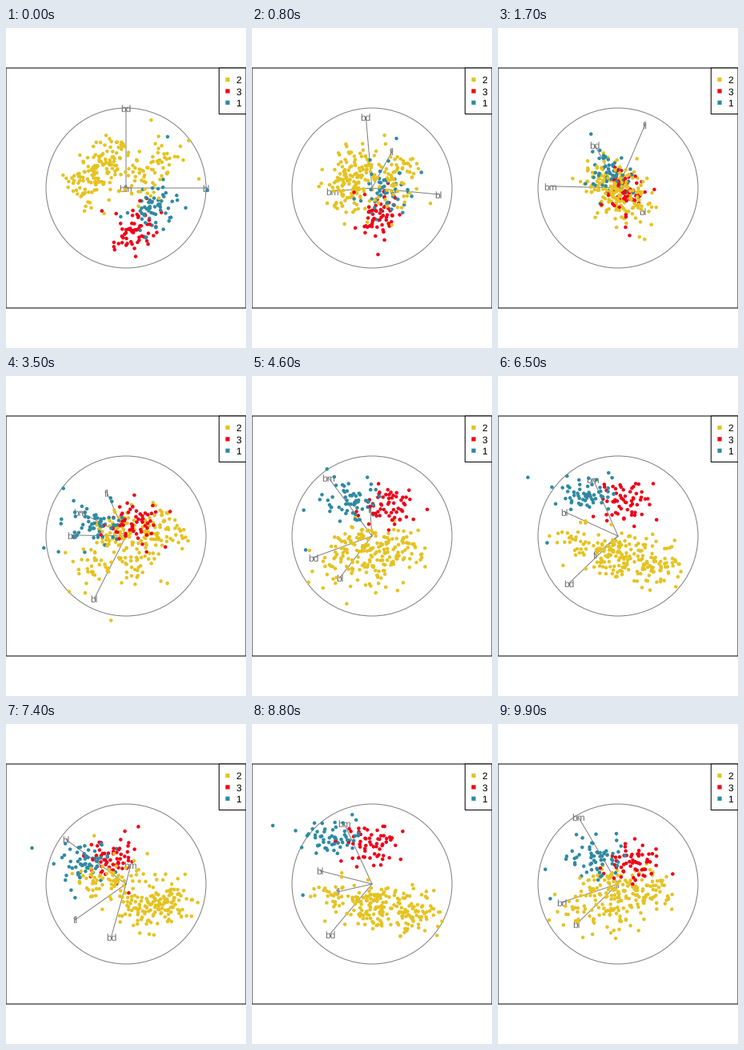
A matplotlib script for the animation above (10000 ms loop, 300x400 px).

```python
import numpy as np
import matplotlib.pyplot as plt
from matplotlib.animation import FuncAnimation
from matplotlib.patches import Circle, Rectangle

W, H, DPI = 300, 400, 100
PX = 72 / DPI
FRAMES, INTERVAL = 100, 100
CENTER, RADIUS, SCALE = np.array([150, 200]), 100, 35.6
YELLOW, RED, BLUE = "#e5c320", "#f00018", "#2f8aa2"
GREY = "#7f7f7f"
NAMES = ["bl", "bd", "fl", "bm"]

plt.rcParams.update({"font.family": "Liberation Sans", "text.hinting": "none",
                     "font.size": 12 * PX})
rng = np.random.default_rng(11)

# Standardised data: three kinds, each with a small and a large half
SPREAD = np.array([0.41, 0.42, 0.41, 0.38])
GROWTH = np.array([0.70, 0.77, 0.50, 0.85])


def kind(n, mean):
    """Two mildly correlated normal clouds, the second one shifted."""
    clouds = []
    for size in (0, 1):
        z = 0.4 * rng.normal(size=(n, 1)) + 0.9 * rng.normal(size=(n, 4))
        z = (z - z.mean(0)) / z.std(0)
        clouds.append(mean + size * GROWTH + z * SPREAD)
    return np.vstack(clouds)


first = kind(73, (-1.29, 0.22, -1.02, -1.04))
second = kind(59, (0.29, -1.49, 0.91, 0.66))
third = kind(34, (0.54, 0.25, -0.62, -0.87))
outliers = [(2.56, 0.32, -1.42, -0.63),
            (2.85, -0.08, 2.07, 2.29),
            (1.46, 1.80, 0.64, 0.74)]

mix = rng.permutation(len(second))
data = np.vstack([first, second[mix], third, outliers])
colors = ([YELLOW] * len(first)
          + [RED if k < len(second) / 2 else BLUE for k in mix]
          + [YELLOW] * len(third) + [YELLOW, BLUE, BLUE])


def basis(x, y):
    """Nearest orthonormal plane to the given screen directions."""
    u, _, vt = np.linalg.svd(np.array([x, y], float).T, full_matrices=False)
    return u @ vt


# Tour stops: step, then each variable's share of the x and y directions
STOPS = [
    (0, basis((1, 0, 0, 0), (0, 1, 0, 0))),
    (17, basis((.31, -.29, .34, -.84), (-.29, .53, .78, .02))),
    (35, basis((-.40, -.68, -.24, -.58), (-.78, .01, .54, .30))),
    (57, basis((-.31, -.84, .11, -.43), (-.10, -.43, -.02, .89))),
    (74, basis((-.75, -.19, -.64, .06), (.55, -.66, -.45, .24))),
    (88, basis((-.65, -.53, -.42, -.34), (.16, -.63, -.10, .75))),
    (99, basis((-.52, -.70, 0, -.49), (-.50, -.23, 0, .83))),
]


def geodesic(a, b, t):
    """Rotate plane a into plane b through their principal angles."""
    u, s, vt = np.linalg.svd(a.T @ b)
    s = np.clip(s, 0, 1)
    ga, gb = a @ u, b @ vt.T
    gz = gb - ga * s
    gz /= np.maximum(np.linalg.norm(gz, axis=0), 1e-9)
    tau = np.arccos(s) * t
    spin = u @ vt
    th = np.arctan2(spin[1, 0], spin[0, 0]) * t
    rot = np.array([[np.cos(th), -np.sin(th)], [np.sin(th), np.cos(th)]])
    return (ga * np.cos(tau) + gz * np.sin(tau)) @ u.T @ rot


def projection(i):
    for (t0, a), (t1, b) in zip(STOPS, STOPS[1:]):
        if i <= t1:
            return geodesic(a, b, (i - t0) / (t1 - t0))


def to_px(xy, scale):
    return CENTER + xy * (scale, -scale)


fig = plt.figure(figsize=(W / DPI, H / DPI), dpi=DPI, facecolor="white")
ax = fig.add_axes([0, 0, 1, 1])
ax.set(xlim=(0, W), ylim=(H, 0))
ax.axis("off")


def box(x, y, w, h, z, face="none", edge="none"):
    ax.add_patch(Rectangle((x, y), w, h, fc=face, ec=edge, lw=PX,
                           snap=False, zorder=z))


ax.add_patch(Circle(CENTER, RADIUS, fill=False, ec=GREY, lw=PX))
spokes = [ax.plot([], [], color=GREY, lw=PX, snap=False, zorder=2)[0]
          for _ in NAMES]
labels = [ax.text(0, 0, s, color="#6f6f6f", ha="center", va="baseline",
                  zorder=3) for s in NAMES]
dots = ax.scatter(*to_px(data[:, :2], SCALE).T, s=(4.5 * PX) ** 2, c=colors,
                  linewidths=0, zorder=4)

box(0, 50, 300, 300, 5, edge="black")
box(266.3, 50, 33.7, 57.5, 6, face="white", edge="black")
for k, (name, col) in enumerate([("2", YELLOW), ("3", RED), ("1", BLUE)]):
    y = 64.5 + 14.4 * k
    ax.add_patch(Rectangle((274.4, y - 2.6), 5.2, 5.2, fc=col, lw=0,
                           snap=False, zorder=7))
    ax.text(287.3, y + 4.6, name, va="baseline", zorder=7)


def update(i):
    plane = projection(i)
    dots.set_offsets(to_px(data @ plane, SCALE))
    for tip, spoke, label in zip(to_px(plane, RADIUS), spokes, labels):
        spoke.set_data(*np.array([CENTER, tip]).T)
        label.set_position(tip + (0, 4.8))
    return [dots, *spokes, *labels]


anim = FuncAnimation(fig, update, frames=FRAMES, interval=INTERVAL,
                     repeat=True, repeat_delay=0, blit=False)
plt.show()
```
